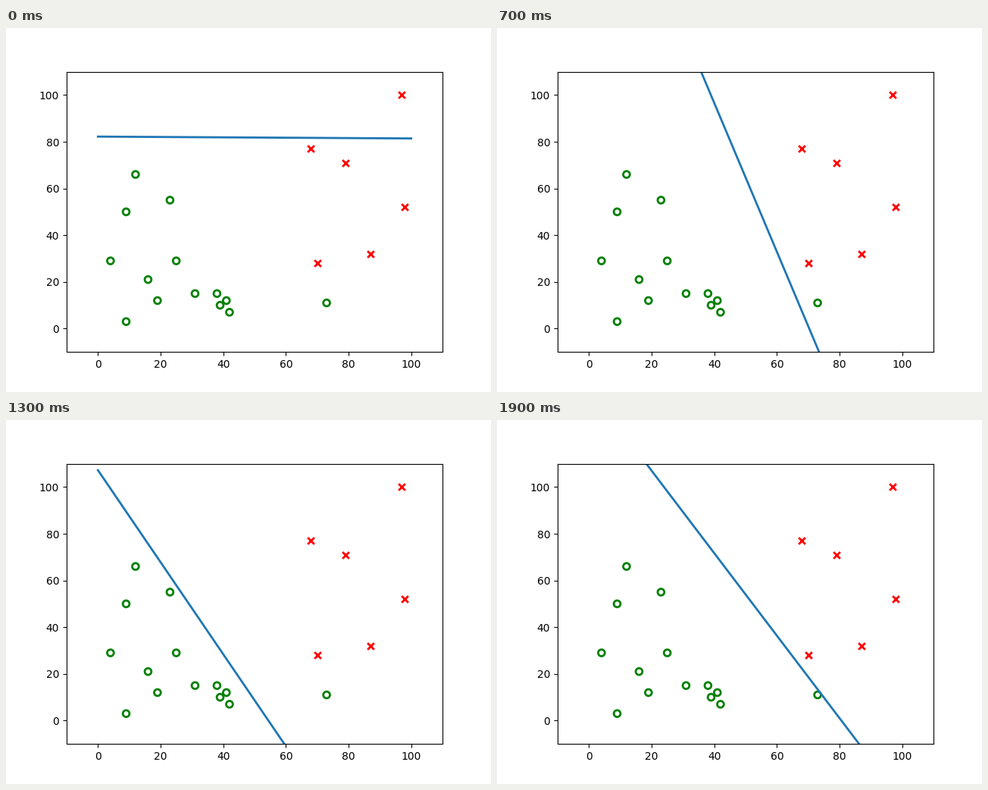
These frames come from a looping animation (640 px wide and 480 px high, 1.93 s). A matplotlib script:

```python
import numpy as np
import matplotlib.pyplot as plt
from matplotlib.animation import FuncAnimation

LOOP_MS = 1930
TICK_MS = 10
STEP_MS = 100
LOW, HIGH = -10, 110

points = np.array([
    (12, 66), (23, 55), (9, 50), (4, 29), (25, 29), (16, 21), (19, 12),
    (31, 15), (38, 15), (41, 12), (39, 10), (42, 7), (9, 3), (73, 11),
    (68, 77), (79, 71), (97, 100), (98, 52), (87, 32), (70, 28)])
is_red = points.sum(axis=1) > 90

# Boundary poses: angle of the normal in degrees, distance from the origin
FLAT = 89.55, 82.2
RISING = -17.167, 39.1
STEEP = 17.428, 67.1
NEAR = 28.217, 50.31
NEAREST = 26.915, 48.53
MIDDLE = 24.129, 63.08
SOLVED = 29.521, 70.13
POSES = {0: FLAT, 3: RISING, 7: STEEP, 9: NEAR, 13: NEAREST,
         15: MIDDLE, 18: NEAREST, 19: SOLVED}
steps = list(POSES)
angles, dists = zip(*POSES.values())


def boundary(step, x):
    angle = np.radians(np.interp(step, steps, angles))
    dist = np.interp(step, steps, dists)
    return (dist - np.cos(angle) * x) / np.sin(angle)


fig, ax = plt.subplots(figsize=(6.4, 4.8), dpi=100)
ax.set_xlim(LOW, HIGH)
ax.set_ylim(LOW, HIGH)

ax.scatter(*points[~is_red].T, s=40, marker="o", facecolors="none",
           edgecolors="green", linewidths=2)
ax.scatter(*points[is_red].T, s=40, marker="x", color="red", linewidths=2)

xs = np.array([0.0, 100.0])
line, = ax.plot(xs, boundary(0, xs), color="#1f77b4", linewidth=2)


def update(frame):
    step = frame * TICK_MS // STEP_MS
    line.set_ydata(boundary(step, xs))
    return line,


anim = FuncAnimation(fig, update, frames=LOOP_MS // TICK_MS,
                     interval=TICK_MS, repeat=True, repeat_delay=0)
plt.show()
```
